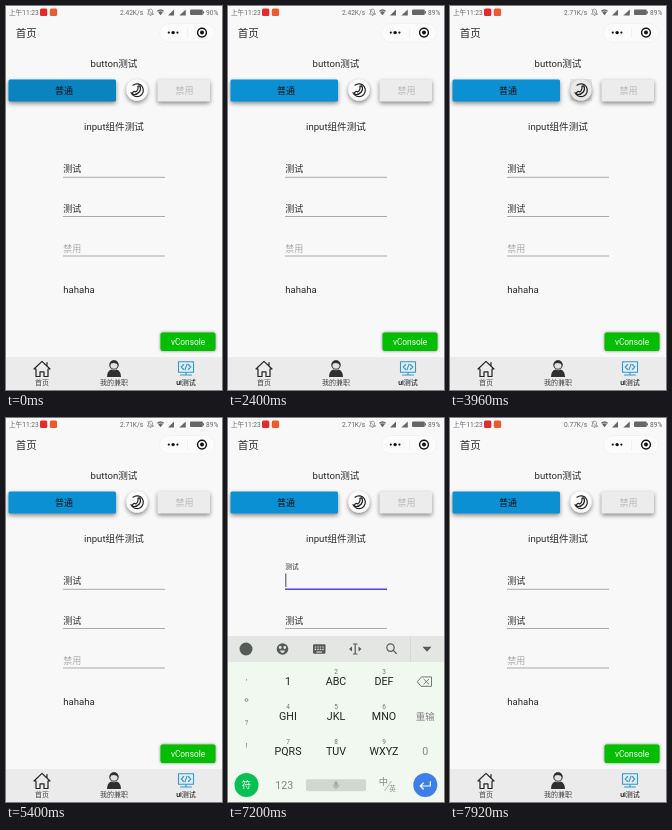
An HTML page that plays this animation: 216 by 384 pixels, repeating every 8000 ms.

```html
<!DOCTYPE html>
<html lang="zh-CN">
<head>
<meta charset="utf-8">
<title>button测试</title>
<style>
html, body { margin: 0; width: 100%; height: 100%; overflow: hidden; background: #f8f8f8; }
svg { display: block; width: 100vw; height: 100vh; }
text { font-family: Roboto, "Noto Sans CJK SC", "Noto Sans CJK", sans-serif; font-size: 9.6px; fill: #2a2a2a; }
.mid { text-anchor: middle; }
.status text { font-size: 6.6px; fill: #666; }
.field { font-size: 9px; }
.tabs text { font-size: 7px; fill: #444; }
.line { fill: none; stroke: #222; stroke-width: 1.2; stroke-linejoin: round; stroke-linecap: round; }
.raised { filter: drop-shadow(0 2px 2px rgba(0, 0, 0, .45)); }
.glow { filter: drop-shadow(0 .3px 1.8px rgba(0, 0, 0, .45)); }
.keys text { font-size: 10.7px; fill: #222; text-anchor: middle; }
.keys .small { font-size: 6.5px; fill: #777; }
.keys .soft { fill: #858585; }
.tools { fill: #565b59; }

.anim { animation: 8s linear infinite; }
.step { animation-timing-function: step-end; }
.full { animation-name: full; }
.less { animation-name: less; }
.speed-a { animation-name: speed-a; }
.speed-b { animation-name: speed-b; }
.speed-c { animation-name: speed-c; }
.ripple, .label { transform-box: fill-box; transform-origin: center; }
.wide { animation-name: wide; }
.round { animation-name: round; }
.label { transform-origin: left center; animation-name: label; }
.focus { transform-origin: 108px 171px; animation-name: focus; }
.caret { animation-name: caret; }
.board { animation-name: board; }

@keyframes full { 0% { opacity: 1 } 4.5%, 100% { opacity: 0 } }
@keyframes less { 0% { opacity: 0 } 4.5%, 100% { opacity: 1 } }
@keyframes speed-a { 0% { opacity: 1 } 43.5%, 100% { opacity: 0 } }
@keyframes speed-b { 0% { opacity: 0 } 43.5% { opacity: 1 } 93.5%, 100% { opacity: 0 } }
@keyframes speed-c { 0% { opacity: 0 } 93.5%, 100% { opacity: 1 } }
/* The loop opens on the last of an earlier tap's ripple. */
@keyframes wide {
  0% { transform: scale(1); opacity: .09 }
  3% { transform: scale(1); opacity: 0 }
  3.01%, 17.5% { transform: scale(0); opacity: .3 }
  27.5%, 100% { transform: scale(1); opacity: 0 }
}
@keyframes round {
  0%, 44% { transform: scale(0); opacity: .25 }
  52%, 100% { transform: scale(1); opacity: 0 }
}
@keyframes label {
  0%, 82.2% { transform: none; animation-timing-function: ease }
  85.2%, 94% { transform: translateY(-14.5px) scale(.74); animation-timing-function: ease }
  97%, 100% { transform: none }
}
@keyframes focus {
  0%, 82.2% { transform: scaleX(0); animation-timing-function: ease }
  85.7%, 94% { transform: scaleX(1); animation-timing-function: ease }
  97.2%, 100% { transform: scaleX(0) }
}
@keyframes caret {
  0% { opacity: 0 }
  82.7%, 94% { opacity: 1 }
  94.01%, 100% { opacity: 0 }
}
@keyframes board {
  0%, 82.5% { transform: translateY(168px); animation-timing-function: ease-out }
  85.5%, 94% { transform: none; animation-timing-function: ease-in }
  96.5%, 100% { transform: translateY(168px) }
}
</style>
</head>
<body>
<svg viewBox="0 0 216 384">
  <defs>
    <clipPath id="wideClip"><rect x="2.5" y="73.4" width="107.5" height="22" rx="1.5"/></clipPath>
    <clipPath id="roundClip"><rect x="120" y="73" width="22" height="22"/></clipPath>
  </defs>
  <rect width="216" height="384" fill="#f8f8f8"/>

  <g class="status">
    <text x="3" y="8.7">上午11:23</text>
    <rect x="34" y="2.5" width="7.3" height="7.5" rx="1.5" fill="#e42a2c"/>
    <rect x="43.8" y="2.5" width="7.3" height="7.5" rx="1.5" fill="#ed5a2c"/>
    <text class="anim step speed-a" x="114" y="8.7">2.42K/s</text>
    <text class="anim step speed-b" x="114" y="8.7">2.71K/s</text>
    <text class="anim step speed-c" x="114" y="8.7">0.77K/s</text>
    <path d="M141.5 8.2h6l-1-1.5v-2q-.5-1.6-2-1.6t-2 1.6v2zM143.8 9.5h1.5M141.6 3l5.6 6" fill="none" stroke="#777" stroke-width=".7"/>
    <g fill="#666">
      <path d="M151 4.7q3.5-3 7 0l-3.5 4.6z"/>
      <path d="M162 9.4l6-6v6zM173.3 9.4l6.5-6v6z"/>
      <rect x="184" y="3.6" width="12.8" height="5.4" rx="1"/>
      <path d="M197 5.2h1v2.2h-1z"/>
    </g>
    <path d="M151.6 6.1q2.9-2.3 5.8 0" fill="none" stroke="#f8f8f8" stroke-width=".6"/>
    <text class="anim step full" x="200" y="8.7">90%</text>
    <text class="anim step less" x="200" y="8.7">89%</text>
  </g>

  <text x="9.7" y="30.5" style="font-size:10.5px">首页</text>
  <rect x="153.5" y="17.5" width="55" height="18.5" rx="9.25" fill="#fbfbfb" stroke="#efefef" stroke-width=".7"/>
  <path d="M181.5 22v10" stroke="#ececec" stroke-width=".7"/>
  <g fill="#111">
    <circle cx="162.8" cy="26.6" r="1.1"/><circle cx="167.1" cy="26.6" r="1.7"/><circle cx="171.4" cy="26.6" r="1.1"/>
    <circle cx="196" cy="26.6" r="2"/>
  </g>
  <circle cx="196" cy="26.6" r="4.4" fill="none" stroke="#111" stroke-width="1.4"/>

  <text class="mid" x="108" y="60.8">button测试</text>
  <rect class="raised" x="2.5" y="73.4" width="107.5" height="22" rx="1.5" fill="#0b90d4"/>
  <g clip-path="url(#wideClip)"><circle class="anim ripple wide" cx="20" cy="82.5" r="110"/></g>
  <text class="mid field" x="58" y="87.6" style="font-weight:500;fill:#111">普通</text>
  <circle class="raised" cx="131" cy="84" r="10.8" fill="#fbfbfb"/>
  <g clip-path="url(#roundClip)"><circle class="anim ripple round" cx="131" cy="84" r="26"/></g>
  <g class="line">
    <path d="M127 79.2a6.4 6.4 0 1 1-2 7.4"/>
    <path d="M132 80.2l1.9-.4q1.5 3.6-.6 6.2t-6 2.8l-1-1.9 1.8-1.6 1.6.6q2-1.2 2.3-3.4z"/>
  </g>
  <rect class="raised" x="151.5" y="73.4" width="52.5" height="22" rx="1.5" fill="#ececec"/>
  <text class="mid field" x="178.5" y="87.6" style="fill:#b8b8b8">禁用</text>

  <text class="mid" x="108" y="124.4">input组件测试</text>
  <text class="anim field label" x="57.3" y="166.2">测试</text>
  <text class="field" x="57.3" y="206">测试</text>
  <text class="field" x="57.3" y="245.6" style="fill:#aaa">禁用</text>
  <path d="M57 171.3h102M57 210.5h102M57 250h102" stroke="#a2a2a2" stroke-width=".9"/>
  <path class="anim focus" d="M57 171.3h102" stroke="#4b49ea" stroke-width="1.5"/>
  <path class="anim step caret" d="M57.8 155.5v13.5" stroke="#555a68" stroke-width="1.1"/>
  <text x="57.2" y="286.5">hahaha</text>

  <rect class="glow" x="154.5" y="326.6" width="55" height="18.4" rx="2" fill="#04be02"/>
  <text class="mid" x="182" y="338.9" style="font-size:8.3px;fill:#fff">vConsole</text>

  <g class="tabs">
    <rect y="351" width="216" height="33" fill="#ebebeb"/>
    <path class="line" d="M28 363l8-7.6 8 7.6h-2v7.5h-4v-4.6h-4v4.6h-4V363zM41 359.5v-3"/>
    <circle cx="108" cy="359" r="4.2" fill="#e2e2e2" stroke="#303030" stroke-width="1.1"/>
    <path d="M103.7 359.4q-.2-5 4.3-5t4.3 5q-1.2-2.2-4.3-2.3t-4.3 2.3zM101 371q0-6 4.2-7.5 2.8 1.6 5.6 0Q115 365 115 371z" fill="#303030"/>
    <g class="line" style="stroke:#2b9bd8;stroke-width:1.1">
      <path d="M172.5 355.7h15v10.5h-15zM174.5 369h11M180 366.2v2.8"/>
      <path d="M177.7 358.5l-2.5 2.5 2.5 2.5M182.3 358.5l2.5 2.5-2.5 2.5M181 358.2l-2 5.6"/>
    </g>
    <text class="mid" x="36" y="379">首页</text>
    <text class="mid" x="108" y="379">我的兼职</text>
    <text class="mid" x="180" y="379" style="font-weight:500;fill:#111">ui测试</text>
  </g>

  <g class="anim board">
    <rect y="218" width="216" height="166" fill="#f0f8ef"/>
    <rect y="218" width="216" height="26" fill="#e3e6e3"/>
    <path d="M182.5 218v26" stroke="#d0d4d0" stroke-width=".7"/>
    <g class="tools">
      <circle cx="18" cy="231" r="6.5"/>
      <circle cx="54.5" cy="231" r="5.8"/>
      <rect x="85" y="226.3" width="12.5" height="9.5" rx="1"/>
      <path d="M121 231l3-2.6v5.2zM133.5 231l-3-2.6v5.2zM194.5 228.7h9l-4.5 5z"/>
    </g>
    <g fill="#e3e6e3">
      <circle cx="52.2" cy="229.5" r="1.4"/><circle cx="56.8" cy="229.5" r="1.4"/>
      <path d="M52 232.6h5q-.6 2.4-2.5 2.4t-2.5-2.4z"/>
    </g>
    <path d="M86.8 229h9M86.8 231.4h9" stroke="#e3e6e3" stroke-width="1.2" stroke-dasharray="1.4 1.1"/>
    <path d="M88.5 234h5.5" stroke="#e3e6e3"/>
    <g class="line" style="stroke:#565b59">
      <path d="M125.5 226h3.5M127.2 226v10M125.5 236h3.5"/>
      <circle cx="162.5" cy="229.6" r="3.7"/><path d="M165.3 232.4l3 3.1"/>
    </g>

    <g class="keys">
      <text class="soft" x="18.5" y="262" style="font-size:8px">,</text>
      <circle cx="18.5" cy="282" r="1.4" fill="none" stroke="#777" stroke-width=".8"/>
      <text class="small" x="18.5" y="306.8" style="font-size:7.5px">?</text>
      <text class="small" x="18.5" y="330" style="font-size:7.5px">!</text>
      <text x="60" y="267.4">1</text>
      <text class="small" x="108" y="256">2</text><text x="108" y="267.4">ABC</text>
      <text class="small" x="156" y="256">3</text><text x="156" y="267.4">DEF</text>
      <text class="small" x="60" y="291">4</text><text x="60" y="302.3">GHI</text>
      <text class="small" x="108" y="291">5</text><text x="108" y="302.3">JKL</text>
      <text class="small" x="156" y="291">6</text><text x="156" y="302.3">MNO</text>
      <text class="small" x="60" y="326">7</text><text x="60" y="337.2">PQRS</text>
      <text class="small" x="108" y="326">8</text><text x="108" y="337.2">TUV</text>
      <text class="small" x="156" y="326">9</text><text x="156" y="337.2">WXYZ</text>
      <path class="line" style="stroke:#777;stroke-width:1" d="M189.5 263.6l4-4.7h10v9.4h-10zM195.9 261.2l4.8 4.8M200.7 261.2l-4.8 4.8"/>
      <text class="soft" x="197.3" y="301.8" style="font-size:9.5px">重输</text>
      <text class="soft" x="197.3" y="337.2">0</text>
      <circle cx="18.5" cy="367" r="12" fill="#06c152"/>
      <text x="18.5" y="370.4" style="fill:#fff;font-size:9.3px">符</text>
      <text class="soft" x="56.3" y="370.5">123</text>
      <rect x="78" y="361.3" width="60" height="12" rx="2" fill="#d3d7d1"/>
      <rect x="106.4" y="363.3" width="3.2" height="5.2" rx="1.6" fill="#a0a5a0"/>
      <path d="M105 366.5q0 3.2 3 3.2t3-3.2M108 370v1.5" fill="none" stroke="#a0a5a0" stroke-width=".8"/>
      <text class="soft" x="155.3" y="366.6" style="font-size:9.3px">中</text>
      <path d="M156.5 373l7-10" stroke="#999" stroke-width=".7"/>
      <text class="soft" x="164.5" y="373" style="font-size:6.5px">英</text>
      <circle cx="197.3" cy="367" r="12" fill="#3d7fe6"/>
      <path class="line" style="stroke:#fff" d="M195.3 365l-3 3 3 3M192.3 368h10v-4.5"/>
    </g>
  </g>
</svg>
</body>
</html>
```
